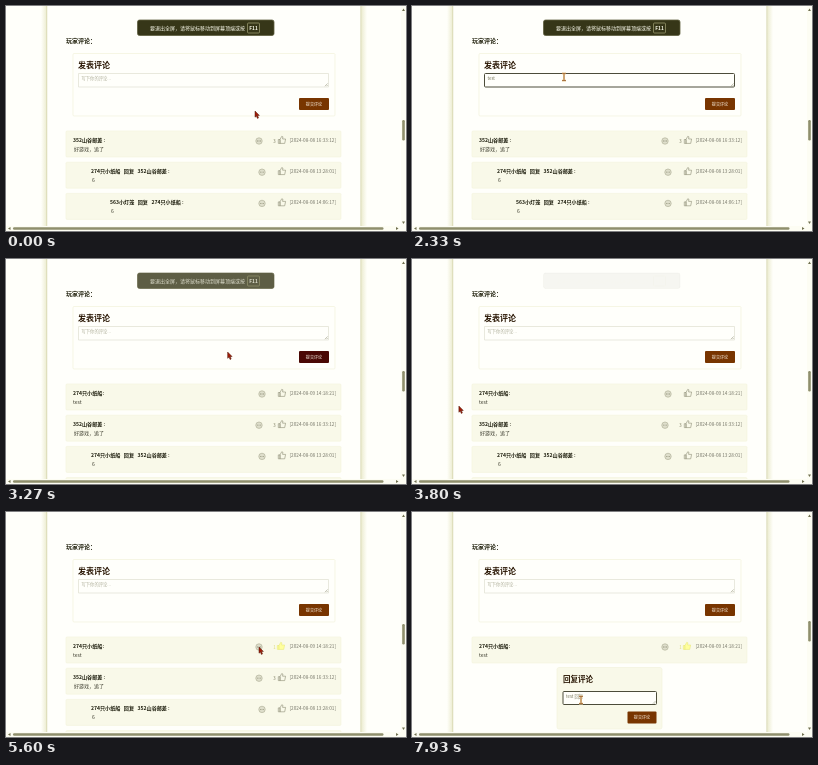
Animation, 400 px wide and 225 px high, one loop 8000 ms. Source, as an HTML page with a canvas:

```html
<!DOCTYPE html>
<html lang="zh-CN">
<head>
<meta charset="utf-8">
<style>
html, body { margin: 0; width: 100%; height: 100%; overflow: hidden; background: #fffffa; }
canvas { display: block; width: 400px; height: 225px; }
</style>
</head>
<body>
<canvas id="stage"></canvas>
<script>
const LOOP = 8000;
const FONT = '"Noto Sans CJK SC", "Noto Sans CJK", "Noto Sans", sans-serif';
const canvas = document.getElementById('stage');
const ctx = canvas.getContext('2d');
const ratio = window.devicePixelRatio || 1;
canvas.width = 400 * ratio;
canvas.height = 225 * ratio;

// Moments of the interaction, in ms
const AT = { focus: 1250, type: 1750, submit: 2950, like: 5050, reply: 5620, replyFocus: 6420, replyType: 6900 };

// Pointer path: time, x, y
const path = [
  [0, 249, 105], [250, 249, 105], [950, 160, 74], [1250, 152, 71], [2420, 152, 71],
  [2850, 306, 97], [3020, 306, 97], [3270, 222, 93], [3800, 47, 147], [3980, 26, 152],
  [4150, 30, 150], [4420, 150, 138], [4800, 266, 128], [4980, 274, 134], [5180, 274, 134],
  [5480, 253, 135], [5720, 253, 135], [6200, 166, 182], [6420, 168, 186], [6800, 169, 188], [8000, 169, 188]
];

const mainForm = { title: '发表评论', x: 72, titleY: 62, size: 8, field: [72.5, 67.5, 250, 13.5], button: [293, 92, 30, 12] };
const replyForm = { title: '回复评论', x: 151, titleY: 169.5, size: 7.5, field: [151, 179.5, 93.5, 13], button: [215.5, 199.5, 29, 12] };

const ann = '352山谷邮差', bo = '274只小纸船', chen = '563小灯笼';
const newest = { x: 67, name: bo + ':', body: 'test', time: '2024-08-09 14:18:21' };
const thread = [
  { x: 67, name: ann + ' :', body: '好游戏，追了', time: '2024-08-08 16:33:12', likes: 3 },
  { x: 85, name: `${bo}   回复   ${ann} :`, body: '6', time: '2024-08-08 13:28:01' },
  { x: 104, name: `${chen}   回复   ${bo} :`, body: '6', time: '2024-08-08 14:06:17' }
];

function rect(x, y, w, h, fill, stroke, line = 1, radius = 0) {
  ctx.beginPath();
  ctx.roundRect(x, y, w, h, radius);
  if (fill) { ctx.fillStyle = fill; ctx.fill(); }
  if (stroke) { ctx.strokeStyle = stroke; ctx.lineWidth = line; ctx.stroke(); }
}

function text(value, x, y, size, color, weight = 400, align = 'left') {
  ctx.font = `${weight} ${size}px ${FONT}`;
  ctx.fillStyle = color;
  ctx.textAlign = align;
  ctx.fillText(value, x, y);
}

function shape(points, fill, stroke, line = 0.6) {
  ctx.beginPath();
  points.forEach(([x, y]) => ctx.lineTo(x, y));
  ctx.closePath();
  if (fill) { ctx.fillStyle = fill; ctx.fill(); }
  if (stroke) { ctx.strokeStyle = stroke; ctx.lineWidth = line; ctx.stroke(); }
}

const typed = (value, t, start, step) => value.slice(0, Math.max(0, Math.floor((t - start) / step) + 1));
const inside = ([x, y, w, h], p) => p.x >= x && p.x <= x + w && p.y >= y && p.y <= y + h;

function pointerAt(t) {
  const i = Math.max(1, path.findIndex(p => p[0] >= t));
  const [t0, x0, y0] = path[i - 1], [t1, x1, y1] = path[i];
  const k = (t - t0) / (t1 - t0);
  return { x: x0 + (x1 - x0) * k, y: y0 + (y1 - y0) * k };
}

function drawPage() {
  rect(0, 0, 400, 225, '#fffffa');
  for (const [edge, side] of [[41, -1], [355, 1]]) {
    const shade = ctx.createLinearGradient(edge, 0, edge + side * 6, 0);
    shade.addColorStop(0, '#ebebce');
    shade.addColorStop(1, '#fffffa');
    rect(Math.min(edge, edge + side * 6), 0, 6, 220, shade);
  }
  rect(41, 0, 314, 220, '#fffffb');
  rect(40.5, 0, 0.7, 220, '#d2d2a8');
  rect(354.5, 0, 0.7, 220, '#d2d2a8');
  text('玩家评论：', 60, 36.5, 6, '#20200c', 700);
}

function drawForm(form, value, focused, buttonColor) {
  const [x, y, w, h] = form.field;
  text(form.title, form.x, form.titleY, form.size, '#2a1704', 700);
  rect(x, y, w, h, '#fffffb', focused ? '#4c4c3a' : '#e0e0d2', focused ? 1 : 0.7, focused ? 1 : 0);
  if (value) text(value, x + 3, y + 6, 4.3, '#77775c');
  else text('写下你的评论...', x + 3, y + 6, 4.3, '#b0b09c');
  ctx.strokeStyle = '#88886c';
  ctx.lineWidth = 0.5;
  ctx.beginPath();
  for (const d of [1.2, 2.8]) {
    ctx.moveTo(x + w - d - 0.8, y + h - 0.8);
    ctx.lineTo(x + w - 0.8, y + h - d - 0.8);
  }
  ctx.stroke();
  const [bx, by, bw, bh] = form.button;
  rect(bx, by, bw, bh, buttonColor, null, 0, 1);
  text('提交评论', bx + bw / 2, by + 7.5, 4.1, '#fff8ea', 400, 'center');
}

function drawBubble(x, y) {
  ctx.beginPath();
  ctx.arc(x, y, 3.2, 0, 7);
  ctx.fillStyle = '#dedecb';
  ctx.fill();
  ctx.strokeStyle = '#b4b49c';
  ctx.lineWidth = 0.7;
  ctx.stroke();
  for (const d of [-1.5, 0, 1.5]) rect(x + d - 0.4, y - 0.4, 0.8, 0.8, '#88886e');
}

function drawThumb(x, y, liked) {
  const fill = liked ? '#ffff9c' : null, stroke = liked ? '#e8e87c' : '#8c8c74';
  const at = points => points.map(([dx, dy]) => [x + dx, y + dy]);
  shape(at([[-3.7, -0.5], [-2, -0.5], [-2, 3.4], [-3.7, 3.4]]), fill, stroke);
  shape(at([[-2, -0.5], [-0.3, -3.6], [0.9, -3.2], [0.6, -1], [3.6, -1], [2.7, 3.4], [-2, 3.4]]), fill, stroke);
}

function drawComment({ x, name, body, time, likes, liked }, top) {
  rect(60, top, 275, 26, '#f9f9e9', '#f3f3dc', 0.6, 1);
  text(name, x, top + 11, 5.1, '#1c1c0c', 700);
  text(body, x + (body === 'test' ? 0 : 1), top + 20, 5, '#38382a');
  drawBubble(likes ? 253 : 256, top + 10);
  if (likes) text(likes, 267.3, top + 11.5, 4.3, liked ? '#d8d870' : '#77775c');
  drawThumb(276 - (liked ? 1 : 0), top + 9, liked);
  text(`[${time}]`, 330, top + 10.5, 4.7, '#77776a', 400, 'right');
}

function drawComments(t) {
  const liked = t >= AT.like;
  const first = { ...newest, liked, likes: liked ? 1 : 0 };
  const list = t >= AT.submit ? [first, ...thread] : thread;
  if (t < AT.reply) {
    list.forEach((comment, i) => drawComment(comment, 125 + i * 31.2));
    return;
  }
  drawComment(first, 125);
  rect(145, 155.5, 105, 61.5, '#f9f9e9', '#f1f1da', 0.6, 2);
  drawForm(replyForm, typed('test 回复', t, AT.replyType, 150), t >= AT.replyFocus, '#783500');
}

function drawToast(t) {
  const alpha = Math.min(1, Math.max(0, (3830 - t) / 700));
  if (!alpha) return;
  ctx.globalAlpha = alpha;
  rect(131.5, 14, 136.5, 15.5, '#363618', '#606040', 0.8, 2);
  text('要退出全屏，请将鼠标移动到屏幕顶端或按', 144, 23.8, 5, '#fffff0');
  rect(241.5, 17, 12, 10, null, '#a4a478', 0.7, 1);
  text('F11', 247.5, 23.8, 4.8, '#fffff0', 700, 'center');
  ctx.globalAlpha = 1;
}

function drawScrollbars(t) {
  const thumbY = t < AT.submit ? 114 : t < AT.reply ? 112 : 109;
  rect(395, 0, 5, 225, '#fdfdf3');
  rect(0, 220, 400, 5, '#fdfdf3');
  rect(396.2, thumbY, 2.6, 20.5, '#8f8f6c', null, 0, 1.2);
  rect(7, 221.2, 370.5, 2.6, '#8f8f6c', null, 0, 1.2);
  const ink = '#707050';
  shape([[397.5, 2.5], [399, 5], [396, 5]], ink);
  shape([[396, 215.5], [399, 215.5], [397.5, 218]], ink);
  shape([[2, 222.5], [4.5, 221], [4.5, 224]], ink);
  shape([[390, 221], [392.5, 222.5], [390, 224]], ink);
}

function drawPointer(t) {
  const p = pointerAt(t);
  if (inside(mainForm.field, p) || (t >= AT.reply && inside(replyForm.field, p))) {
    const { x, y } = p;
    for (const [color, line] of [['#f8dfad', 2], ['#9c6432', 0.9]]) {
      ctx.strokeStyle = color;
      ctx.lineWidth = line;
      ctx.beginPath();
      ctx.moveTo(x - 2, y - 3.6); ctx.lineTo(x + 2, y - 3.6);
      ctx.moveTo(x, y - 3.6); ctx.lineTo(x, y + 3.6);
      ctx.moveTo(x - 2, y + 3.6); ctx.lineTo(x + 2, y + 3.6);
      ctx.stroke();
    }
    return;
  }
  const arrow = [[0, 0], [0, 6.2], [1.4, 5], [2.4, 7.4], [3.5, 6.9], [2.6, 4.6], [4.4, 4.4]];
  shape(arrow.map(([dx, dy]) => [p.x + dx, p.y + dy]), '#a01c08', '#4c1608', 0.5);
}

function draw(t) {
  ctx.setTransform(ratio, 0, 0, ratio, 0, 0);
  drawPage();
  rect(67, 47.5, 262, 62.5, '#fffffb', '#f2f2dc', 0.7, 1);
  const editing = t >= AT.focus && t < AT.submit;
  const pressed = t >= 2800 && t < 3420;
  drawForm(mainForm, editing ? typed('test', t, AT.type, 140) : '', editing, pressed ? '#4a0804' : '#783500');
  drawComments(t);
  drawScrollbars(t);
  drawToast(t);
  drawPointer(t);
}

function frame() {
  draw(performance.now() % LOOP);
  requestAnimationFrame(frame);
}
frame();
</script>
</body>
</html>
```
